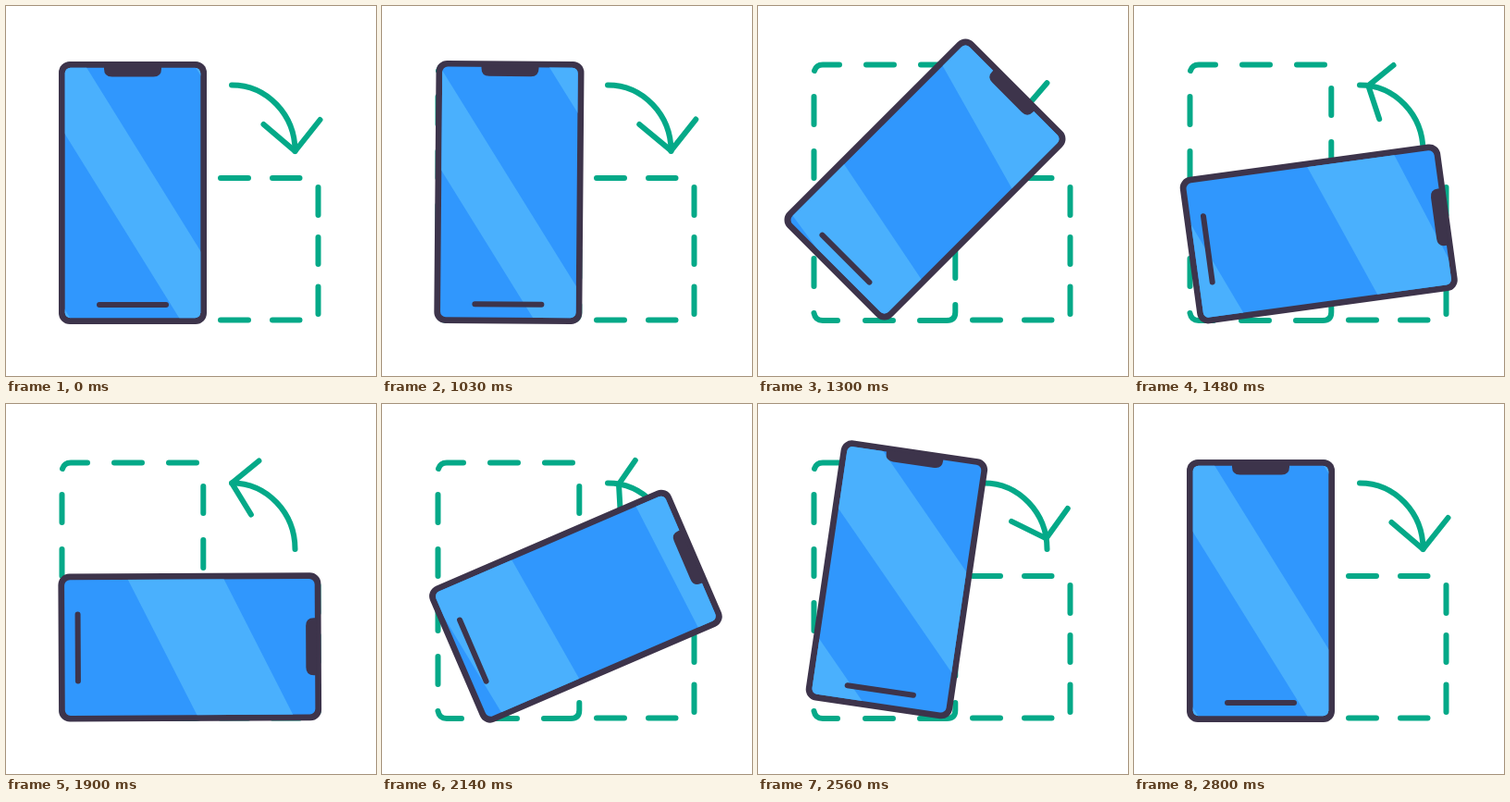
An HTML page that plays this animation: 400x400 px, repeating every 2830 ms.

```html
<!DOCTYPE html>
<html lang="en">
<head>
<meta charset="utf-8">
<title>Rotate device</title>
<style>
  html, body { margin: 0; width: 100%; height: 100%; overflow: hidden; background: #fff; }
  svg { display: block; width: 100vw; height: 100vh; }
  .line { fill: none; stroke: #04a988; stroke-width: 6; stroke-linecap: round; stroke-linejoin: round; }
  .case { fill: #3d344b; }
  .home { stroke: #3d344b; stroke-width: 6; stroke-linecap: round; }
</style>
</head>
<body>
<svg viewBox="0 0 400 400">
  <defs>
    <clipPath id="screen">
      <rect class="turn" x="-73.3" y="-135.3" width="146.6" height="270.6" rx="6"/>
    </clipPath>
  </defs>

  <path class="line" stroke-width="5.6" d="
    M61 70Q63 63.5 70 63.5H88 M117 63.5H147 M176 63.5H206
    M60.5 98V128 M60.5 157V186 M60.5 215V245 M60.5 273V303
    M213.3 89V118 M213.3 147V177 M213.3 206V235 M213.3 264V294
    M60.5 332Q62 340 70 340H86 M116 340H146 M175 340H204Q213.3 340 213.3 331V323"/>
  <path class="line" d="
    M232 186H262 M288 186H317.5 M232 339.5H262 M288 339.5H317.5
    M337.5 196V226 M337.5 250V279 M337.5 303.5V333"/>
  <path class="line" d="M244 85.5C282 85.5 312.5 117.5 312.5 157"/>
  <path class="line" id="head"/>

  <rect class="turn case" x="-80" y="-142" width="160" height="284" rx="12"/>
  <g clip-path="url(#screen)">
    <rect width="400" height="400" fill="#3097fd"/>
    <path id="glare" fill="#4ab0fd"/>
  </g>
  <g class="turn">
    <path class="case" d="M-31 -137H31V-134Q31 -125.5 22.5 -125.5H-22.5Q-31 -125.5 -31 -134Z"/>
    <path class="home" d="M-36 121H36"/>
  </g>
</svg>
<script>
  const LOOP = 2830, STEP = 30;
  const OUT = [1000, 1600], BACK = [1870, 2800];
  const turning = document.querySelectorAll('.turn');
  const head = document.getElementById('head');
  const glare = document.getElementById('glare');

  const clamp = v => Math.min(1, Math.max(0, v));
  const mix = (a, b, k) => a + (b - a) * k;
  const span = (t, [from, to]) => clamp((t - from) / (to - from));

  // Cubic easing with flat ends; x1 and x2 set the influence of each end.
  function ease(x, x1, x2) {
    let lo = 0, hi = 1;
    for (let i = 0; i < 30; i++) {
      const s = (lo + hi) / 2, r = 1 - s;
      if (3 * x1 * s * r * r + 3 * x2 * s * s * r + s ** 3 < x) lo = s; else hi = s;
    }
    return lo * lo * (3 - 2 * lo);
  }

  // time, left edge of a light band, light width, dark width, lean, change of lean
  const bands = [
    [1000, 288, 68, 118, .621, 0],
    [1030, 264, 68, 118, .621, 0],
    [1300, 18, 94.5, 163.5, .614, -.00065],
    [1600, -112, 104, 160, .51, 0],
    [1870, 416, 104, 160, .51, 0],
    [1900, 401, 104, 160, .51, 0],
    [2320, 260, 114, 164, .587, -.00058],
    [2560, 147, 91, 118, .69, 0],
    [2800, 102, 68, 118, .621, 0]
  ];

  function bandAt(t) {
    const i = bands.findIndex(b => b[0] > t);
    if (i === 0) return bands[0];
    if (i < 0) return bands[bands.length - 1];
    const a = bands[i - 1], b = bands[i];
    // The glare rests while the phone lies still.
    if (a[0] === OUT[1]) return a;
    const k = (t - a[0]) / (b[0] - a[0]);
    return a.map((v, n) => mix(v, b[n], k));
  }

  function drawGlare(t) {
    const [, left, light, dark, lean, bend] = bandAt(t);
    const edge = x => {
      const m = lean + bend * (x - 200);
      return [x - 200 * m, x + 200 * m];
    };
    let d = '';
    for (let n = -4; n <= 4; n++) {
      const x = left + n * (light + dark);
      const [a, b] = edge(x), [c, e] = edge(x + light);
      d += `M${a} 0H${c}L${e} 400H${b}Z`;
    }
    glare.setAttribute('d', d);
  }

  function drawPhone(p, returning) {
    const a = p * Math.PI / 2;
    const s2 = Math.sin(2 * a), s4 = Math.sin(4 * a);
    const dx = returning ? 18.5 * s2 - 2.5 * s4 : -3.5 * s4;
    const dy = returning ? 35 * s2 + 5 * s4 : 32.5 * s2;
    const x = 137 + 61.5 * Math.sin(a) + dx;
    const y = 263.5 - 61.5 * Math.cos(a) - dy;
    turning.forEach(el => el.setAttribute('transform', `translate(${x} ${y}) rotate(${p * 90})`));
  }

  // The head slides along the arc while its arms fold over to the other side.
  function drawHead(slide, fold) {
    const a = slide * Math.PI / 2, c = Math.cos(a), s = Math.sin(a);
    const x = 244 + 68.5 * c, y = 157 - 71.5 * s;
    const arm = (back, side) => `${x + c * side - s * back} ${y - s * side - c * back}`;
    const outer = arm(mix(34, -29.5, fold), mix(27, 24, fold) + 5 * Math.sin(fold * Math.PI));
    const inner = arm(mix(29, -21, fold), -34);
    head.setAttribute('d', `M${outer}L${x} ${y}L${inner}`);
  }

  function draw(now) {
    const t = Math.floor((now % LOOP - 10) / STEP) * STEP + 10;
    const returning = t >= BACK[0];
    const k = span(t, returning ? BACK : OUT);
    const turn = returning ? 1 - ease(k, .33, .48) : ease(k, .4, .6);
    const slide = returning ? 1 - ease(k, .6, .45) : turn;
    drawPhone(turn, returning);
    drawHead(slide, turn);
    drawGlare(t);
  }

  const start = performance.now();
  function tick() {
    draw(performance.now() - start);
    requestAnimationFrame(tick);
  }
  tick();
</script>
</body>
</html>
```
